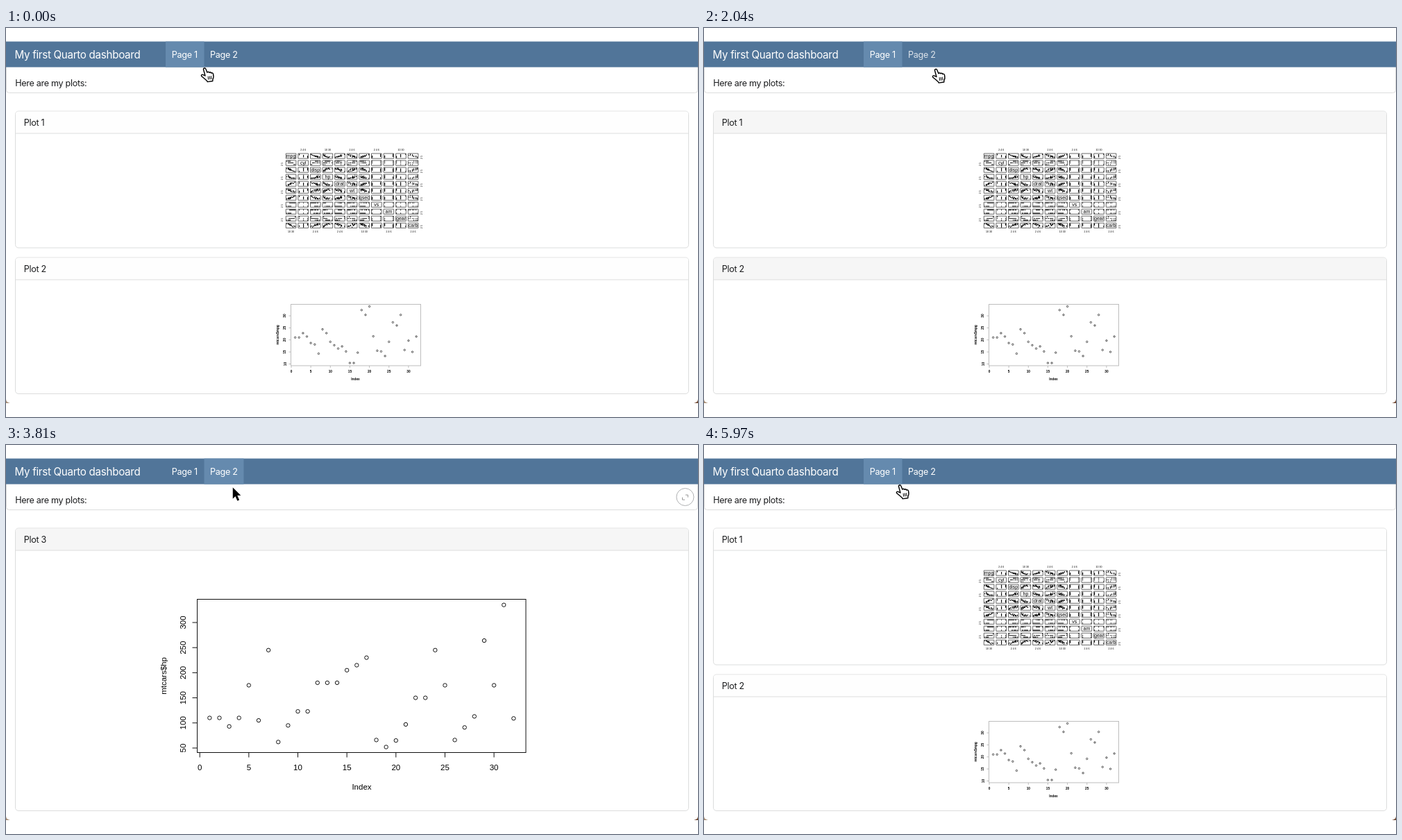
Write an HTML page that moves like this. It is 997x561 px and loops after 6.42 s.

```html
<!DOCTYPE html>
<html lang="en">
<head>
<meta charset="utf-8">
<title>Dashboard</title>
<style>
html, body { margin: 0; width: 100%; height: 100%; overflow: hidden; background: #fff; }
svg { display: block; width: 997px; height: 561px; }
.ui { font-family: Inter, "Open Sans", sans-serif; font-size: 12.6px; letter-spacing: -.025em; fill: #1b1c1e; }
.plot { font-family: "Liberation Sans", Arial, sans-serif; fill: #000; }
.card { fill: #fff; stroke: #dcdddd; }
</style>
</head>
<body>
<svg id="stage" viewBox="0 0 997 561">
  <defs><clipPath id="win"><rect y="19" width="997" height="522"/></clipPath></defs>
  <rect width="997" height="561" fill="#fff"/>
  <g clip-path="url(#win)">
    <path class="card" d="M.5 50V89.500Q.5 93.500 4.500 93.500H992.500Q996.500 93.500 996.500 89.500V50Z"/>
    <rect y="19.500" width="997" height="37" fill="#517599"/>
    <rect id="tab" x="230" y="19.500" height="37" fill="#658aae"/>
    <g class="ui">
      <text x="12.500" y="44.300" style="font-size:15.2px;fill:#fff">My first Quarto dashboard</text>
      <text id="nav1" x="238.800" y="42.800" style="fill:#fff">Page 1</text>
      <text id="nav2" x="294" y="42.800" style="fill:#fff">Page 2</text>
      <text x="13.300" y="83.800">Here are my plots:</text>
    </g>
    <g id="page1"></g>
    <g id="page2"></g>
    <g id="expand" fill="none" stroke="#85888b">
      <circle cx="978.500" cy="75" r="12.500" fill="#fff"/>
      <path d="M979 72H982.500V75.500M974.500 75.500V79H978" stroke="#666"/>
    </g>
    <g id="status">
      <path d="M-1 527.500H97.500Q99.500 527.500 99.500 529.500V542H-1Z" fill="#fff" stroke="#d5d5d5"/>
      <text id="link" class="ui" x="2.800" y="537.600" style="font-size:8.2px;letter-spacing:0;fill:#3c3f42"></text>
    </g>
    <path d="M0 535.500Q.5 540 6 541H0Z" fill="#a58a72"/>
    <path d="M997 535.500Q996.500 540 991 541H997Z" fill="#6d432b"/>
    <g id="ring" fill="none">
      <circle r="37" stroke="#fff" stroke-opacity=".7" stroke-width="1.500"/>
      <circle r="38" stroke="#1c1c1c" stroke-width="1.500"/>
    </g>
    <g id="hand" stroke="#000" stroke-width="1.400" stroke-linejoin="round" stroke-linecap="round">
      <path fill="#fff" d="M3.600 3.200C2.800 1 5.800 -.1 6.800 2L9 7.200C9.200 5.900 11.400 5.900 11.900 7.400C12.600 6.300 14.400 6.700 14.700 8C15.800 7.200 17.400 8 17.600 9.600C18.200 12.500 18.200 15 16.900 17L16.800 19.500L9.200 20.600L8.400 19C6.500 17.500 3.500 14.500 .8 12.600C-.3 11.200 1 9.600 2.800 10.300L6 12Z"/>
      <path fill="none" stroke-width="1" d="M10.200 13L10.600 17M12.400 12.800L12.800 16.800M14.600 12.600L14.900 16.500"/>
    </g>
    <path id="arrow" d="M0 0V16.200L3.700 12.700L6.600 19.200L9.400 18L6.500 11.600H11.600Z" fill="#000" stroke="#fff" stroke-width="1.800" stroke-linejoin="round" paint-order="stroke"/>
  </g>
</svg>
<script>
const LOOP = 6420, STEP = 30;
const $ = id => document.getElementById(id);

const mpg = [21, 21, 22.8, 21.4, 18.7, 18.1, 14.3, 24.4, 22.8, 19.2, 17.8, 16.4, 17.3, 15.2, 10.4, 10.4,
  14.7, 32.4, 30.4, 33.9, 21.5, 15.5, 15.2, 13.3, 19.2, 27.3, 26, 30.4, 15.8, 19.7, 15, 21.4];
const hp = [110, 110, 93, 110, 175, 105, 245, 62, 95, 123, 123, 180, 180, 180, 205, 215,
  230, 66, 52, 65, 97, 150, 150, 245, 175, 66, 91, 113, 264, 175, 335, 109];

let seed = 7;
const rand = () => (seed = seed * 16807 % 2147483647) / 2147483647;

function label(x, y, s, size, turn, extra = '') {
  const spin = turn ? ` transform="rotate(-90 ${x} ${y})"` : '';
  return `<text x="${x}" y="${y}" font-size="${size}" text-anchor="middle"${spin} ${extra}>${s}</text>`;
}

function card(y, h, title) {
  return `<rect class="card" x="13.500" y="${y}" width="970" height="${h}" rx="4.500"/>
    <path class="head" d="M14 ${y + 32}V${y + 4.5}Q14 ${y + .5} 18 ${y + .5}H979Q983 ${y + .5} 983 ${y + 4.5}V${y + 32}Z"/>
    <path d="M14 ${y + 32}H983" stroke="#dcdddd"/>
    <text class="ui" x="25.800" y="${y + 20.8}">${title}</text>`;
}

// Index plot; x0/dx and y0/dy map data units to pixels.
function scatter(o) {
  const X = i => o.x0 + i * o.dx, Y = v => o.y0 - (v - o.base) * o.dy;
  const [l, t, r, b] = o.box;
  let ticks = '', marks = '', text = '';
  for (let i = 0; i <= 30; i += 5) {
    ticks += `M${X(i)} ${b}v${o.tick}`;
    text += label(X(i), o.xText, i, o.size);
  }
  for (let v = o.base; v <= o.top; v += o.by) {
    ticks += `M${l} ${Y(v)}h${-o.tick}`;
    text += label(o.yText, Y(v), v, o.size, true);
  }
  o.data.forEach((v, i) => marks += `<circle cx="${X(i + 1)}" cy="${Y(v)}" r="${o.r}"/>`);
  text += label(o.xName[0], o.xName[1], 'Index', o.size) + label(o.yName[0], o.yName[1], o.name, o.size, true);
  return `<g class="plot" ${o.bold ? 'font-weight="bold"' : ''}>
    <rect x="${l}" y="${t}" width="${r - l}" height="${b - t}" fill="none" stroke="${o.frame}"/>
    <path d="${ticks}" stroke="${o.frame}"/>
    <g fill="none" stroke="#111" stroke-width="${o.line}">${marks}</g>${text}</g>`;
}

// Scatterplot matrix: each variable follows engine size, some in a few levels.
function matrix() {
  const names = ['mpg', 'cyl', 'disp', 'hp', 'drat', 'wt', 'qsec', 'vs', 'am', 'gear', 'carb'];
  const levels = [0, 3, 0, 0, 0, 0, 0, 2, 2, 3, 6];
  const falling = [0, 4, 6, 7, 8, 9];
  const vars = names.map((name, k) => mpg.map((m, i) => {
    if (k == 0) return (m - 10) / 24;
    if (k == 3) return (hp[i] - 52) / 283;
    const size = 1 - (m - 10) / 24;
    let v = (falling.includes(k) ? 1 - size : size) + (rand() - .5) * .5;
    v = Math.min(1, Math.max(0, v));
    return levels[k] ? Math.round(v * (levels[k] - 1)) / (levels[k] - 1) : v;
  }));
  const dx = 17.6, dy = 10.02, w = 14.6, h = 7.2;
  let boxes = '', dots = '', text = '';
  for (let r = 0; r < 11; r++) for (let c = 0; c < 11; c++) {
    const x = 403.3 + c * dx, y = 181 + r * dy;
    boxes += `M${x} ${y}h${w}v${h}h${-w}z`;
    if (r == c) { text += label(x + w / 2, y + 5.6, names[r], 7); continue; }
    const seen = new Set();
    for (let i = 0; i < 32; i++) {
      const px = (x + .6 + vars[c][i] * (w - 2.4)).toFixed(0);
      const py = (y + .6 + (1 - vars[r][i]) * (h - 2.4)).toFixed(1);
      if (seen.has(px + py)) continue;
      seen.add(px + py);
      dots += `M${px} ${py}h1.200v1.100h-1.200z`;
    }
  }
  for (let k = 0; k < 11; k++) {
    const cx = 410.6 + k * dx, cy = 184.6 + k * dy, odd = k % 2;
    text += label(cx, odd ? 177.3 : 294.5, k % 3 ? '2 4 6' : '10 30', 3.6);
    text += label(odd ? 399.5 : 600, cy + 2, '2 5', 3.6, true);
  }
  return `<g class="plot"><path d="${boxes}" fill="none" stroke="#444" stroke-width=".8"/>
    <path d="${dots}" fill="#111"/>${text}</g>`;
}

$('page1').innerHTML = card(120, 197, 'Plot 1') + matrix() + card(331, 196.5, 'Plot 2') + scatter({
  data: mpg, name: 'mtcars$mpg', box: [410.5, 398.5, 597.5, 487], frame: '#bdbdbd',
  x0: 411, dx: 5.63, y0: 484.5, dy: 3.47, base: 10, top: 30, by: 5, tick: 3,
  size: 4.8, bold: true, xText: 496.5, yText: 403.5, xName: [503.5, 508], yName: [392.5, 442.5], r: 1.2, line: .7
});
$('page2').innerHTML = card(120, 407.5, 'Plot 3') + scatter({
  data: hp, name: 'mtcars$hp', box: [275.5, 222.5, 749, 443.5], frame: '#111',
  x0: 279.2, dx: 14.13, y0: 437, dy: .724, base: 50, top: 300, by: 50, tick: 7,
  size: 11.5, xText: 468.6, yText: 259, xName: [512.5, 497], yName: [231, 333], r: 2.7, line: 1
});
const heads = document.querySelectorAll('.head');

const clamp = v => Math.min(1, Math.max(0, v));
const ramp = (t, a, b) => clamp((t - a) / (b - a));
const pulse = (t, a, b, c, d) => ramp(t, a, b) - ramp(t, c, d);
const within = (t, a, b) => t >= a && t < b;
const show = (id, on) => $(id).setAttribute('visibility', on ? 'visible' : 'hidden');
const fade = (id, v) => $(id).setAttribute('opacity', v);
const move = (id, x, y) => $(id).setAttribute('transform', `translate(${x} ${y})`);

// Pointer tip: time, x, y
const track = [[0, 286, 58], [1680, 286, 58], [2040, 334, 59.5], [2310, 344, 55], [3600, 344, 55],
  [3900, 322, 63], [4230, 292, 58], [4260, 292, 58], [4560, 282, 58], [LOOP, 282, 58]];
function tip(t) {
  const i = track.findIndex(k => k[0] > t), [a, b] = [track[i - 1], track[i]];
  const u = ramp(t, a[0], b[0]), e = u * u * (3 - 2 * u);
  return [a[1] + (b[1] - a[1]) * e, a[2] + (b[2] - a[2]) * e];
}

function draw(t) {
  const second = within(t, 2700, 5370);
  show('page1', !second);
  show('page2', second);
  $('tab').setAttribute('x', second ? 285.5 : 230);
  $('tab').setAttribute('width', second ? 57 : 55.5);
  const shade = within(t, 450, 5970) ? '#f6f6f6' : '#fefefe';
  heads.forEach(h => h.setAttribute('fill', shade));

  fade('nav1', 1 - .2 * pulse(t, 4380, 4560, 5370, 5550));
  fade('nav2', 1 - .2 * pulse(t, 1740, 1920, 2700, 3030));
  fade('expand', pulse(t, 3690, 3870, 4440, 4620));
  fade('status', pulse(t, 420, 600, 1320, 1530) + pulse(t, 2340, 2520, 2760, 3000) + pulse(t, 4860, 5040, 5370, 5580));
  $('link').textContent = 'localhost:6464/#page-' + (within(t, 2000, 3500) ? 2 : 1);

  const [x, y] = tip(t), arrow = within(t, 3690, 4410);
  show('hand', !arrow);
  show('arrow', arrow);
  move('hand', x - 5, y - 1);
  move('arrow', x, y);
  move('ring', x - 5.5, y - 4.3);
  show('ring', [1170, 2550, 5220].some(c => within(t, c, c + 150)));
}

const start = performance.now();
function tick(now) {
  const t = Math.max(0, now - start) % LOOP;
  draw(Math.floor(t / STEP) * STEP);
  requestAnimationFrame(tick);
}
draw(0);
requestAnimationFrame(tick);
</script>
</body>
</html>
```
